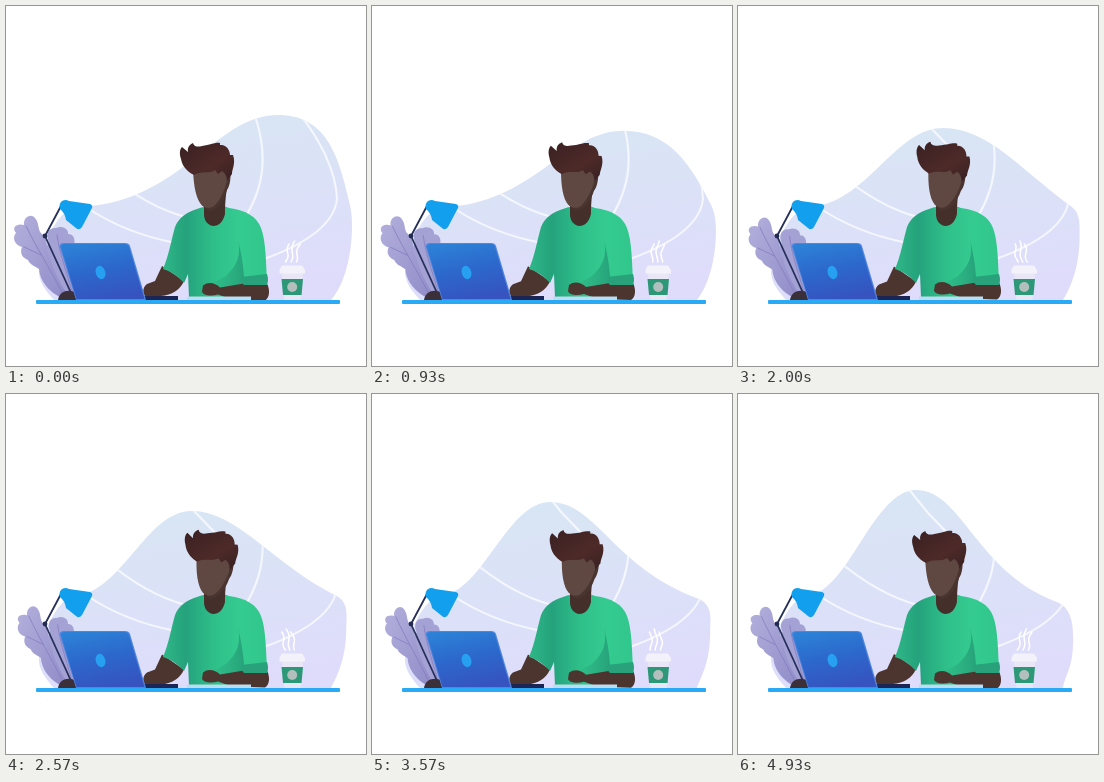
These frames come from a looping animation (360 px wide and 360 px high, 5 s). An HTML page:

```html
<!DOCTYPE html>
<html lang="en">
<head>
<meta charset="utf-8">
<title>Working at a desk</title>
<style>
html, body { margin: 0; width: 100%; height: 100%; overflow: hidden; background: #fff; }
svg { display: block; width: 100vw; height: 100vh; }
.line { fill: none; stroke-linecap: round; stroke-linejoin: round; }
</style>
</head>
<body>
<svg viewBox="0 0 360 360">
  <defs>
    <linearGradient id="sky" x1="0.3" y1="0" x2="0.55" y2="1">
      <stop offset="0" stop-color="#d8e6f4"/>
      <stop offset="1" stop-color="#dfdcfb"/>
    </linearGradient>
    <linearGradient id="screen" x1="0.3" y1="0" x2="0.6" y2="1">
      <stop offset="0" stop-color="#2c80d6"/>
      <stop offset="0.45" stop-color="#2c69cc"/>
      <stop offset="1" stop-color="#3653c0"/>
    </linearGradient>
    <linearGradient id="leaf" x1="0" y1="0" x2="1" y2="1">
      <stop offset="0" stop-color="#b3b0dc"/>
      <stop offset="1" stop-color="#8f8bc8"/>
    </linearGradient>
    <linearGradient id="shirt" x1="0" y1="0" x2="1" y2="0">
      <stop offset="0" stop-color="#2fb787"/>
      <stop offset="0.22" stop-color="#25a27c"/>
      <stop offset="0.5" stop-color="#2fc08a"/>
      <stop offset="0.75" stop-color="#34cb90"/>
      <stop offset="1" stop-color="#31c68c"/>
    </linearGradient>
    <linearGradient id="fold" x1="0" y1="0" x2="1" y2="0">
      <stop offset="0" stop-color="#27a27a" stop-opacity="0"/>
      <stop offset="0.6" stop-color="#27a27a"/>
    </linearGradient>
    <linearGradient id="hair" x1="0" y1="0" x2="1" y2="1">
      <stop offset="0" stop-color="#3a2022"/>
      <stop offset="0.6" stop-color="#4d2a28"/>
      <stop offset="1" stop-color="#372022"/>
    </linearGradient>
    <clipPath id="inside"><path id="clip"/></clipPath>
  </defs>

  <path id="blob" fill="url(#sky)"/>
  <g class="line" clip-path="url(#inside)" stroke="#f4f7fd" stroke-width="2.1">
    <path d="M247 104C259 137 263 172 240 210"/>
    <path d="M169 93L190 119L216 146"/>
    <path d="M98 165C118 182 145 202 180 211"/>
    <path d="M80 201C105 218 133 230 170 237"/>
    <path d="M292 106C313 132 330 164 331 193C328 221 294 240 258 253"/>
  </g>

  <g id="plant">
    <path fill="url(#leaf)" d="M61 294C48 290 34 278 33 263C29 260 24 259 22 254C15 251 14 246 16 241C8 239 6 231 10 227C5 221 11 217 18 219C17 211 25 207 29 212C34 218 31 224 36 228C42 232 39 239 43 244C53 254 60 275 61 294Z"/>
    <path fill="#a4a1d5" d="M65 294C55 279 47 265 44 251C40 246 40 240 43 236C39 228 43 221 50 222C56 219 63 223 62 228C69 228 70 236 67 241C71 248 72 258 72 266L75 294Z"/>
    <g class="line" stroke="#837dbd" stroke-width=".8">
      <path d="M20 220C30 241 42 259 58 290M35 249L18 241"/>
      <path d="M51 229C54 250 62 270 68 292"/>
    </g>
  </g>

  <!-- lamp -->
  <path class="line" stroke="#26305a" stroke-width="1.8" d="M55 200L39 230L66 289"/>
  <circle cx="39" cy="230" r="2.4" fill="#222b50"/>
  <path fill="#12a0ee" d="M54 203C52 197 57 192 63 195L84 198Q87 199 86 202L76 221Q73 225 70 222L60 214Q59 207 54 203Z"/>
  <path fill="#3b2f3a" d="M52 294C53 287 59 284 65 285C71 286 73 290 74 294Z"/>

  <!-- person -->
  <path id="leftHand" fill="#4d352f" d="M156 260L178 275C174 284 166 289 155 290L141 291C136 290 136 281 141 278L149 275Z"/>
  <path fill="url(#shirt)" d="M191 203C201 199 217 199 223 202C240 204 251 211 255 222C260 235 260 257 261 275L244 278L238 292H183L182 268L178 277Q168 266 157 263C163 249 165 235 169 221C173 211 181 206 191 203Z"/>
  <path fill="url(#fold)" d="M232 234C235 248 232 259 220 270L203 279L238 288L261 278V270L238 271C237 257 235 246 232 234Z"/>
  <path fill="#452f2b" d="M198 190L221 181C219 195 219 204 219 208C217 216 213 220 207 220C201 219 198 214 198 208Z"/>
  <g id="head">
    <path fill="#493430" d="M190 163L223 160C226 170 224 180 221 184C218 195 212 204 203 205L196 199Z"/>
    <path fill="#5f4841" d="M187 158L222 158C223 176 217 190 210 198C205 204 198 203 194 197C189 189 187 175 187 158Z"/>
    <path fill="url(#hair)" d="M188 169C180 165 176 159 175 153C173 147 174 143 176 141L182 146C181 140 185 138 187 137C188 141 192 141 196 140C205 139 209 136 214 137L214 139C220 138 224 144 224 149L227 149C230 157 226 163 226 168L221 175C221 170 219 167 216 165L212 168L209 164C203 168 196 165 190 168Z"/>
  </g>
  <g id="rightHand" fill="#4d352f">
    <path d="M197 279C202 275 209 276 214 281L238 277H261C264 283 264 291 259 294L226 293L212 288C205 290 197 289 196 285Z"/>
  </g>
  <path fill="#29a27c" d="M235 271L261 268Q263 274 261 279H238Q235 276 235 271Z"/>
  <path fill="#bcdcf0" d="M181 290.500H245V294H181Z"/>

  <!-- laptop -->
  <path fill="#1d2554" d="M137 290H172V294H137Z"/>
  <path fill="#4f86e0" d="M53.500 240Q54 237 58 237H119Q123 237 124 240L140 294H70Z"/>
  <path fill="url(#screen)" d="M55 241Q55 238 59 238H119Q122 238 123 241L138.500 293H70.500Z"/>
  <ellipse cx="94.500" cy="266.500" rx="4.800" ry="6.800" transform="rotate(-16 94.500 266.500)" fill="#28a0f2"/>

  <!-- cup -->
  <path fill="#e9e7f6" d="M276 267H297L294.500 294H278.500Z"/>
  <path fill="#f3f2fa" d="M275 261Q275 259.500 277 259.500H295Q297 259.500 297 261L299 264V267.500H273.500V264Z"/>
  <path fill="#2d9878" d="M275.500 273H297L295.500 289H277Z"/>
  <circle cx="286.200" cy="281" r="5" fill="#b3bfbd"/>
  <path id="steam" class="line" stroke="#fff" stroke-width="1.5"/>

  <rect x="30" y="294" width="304" height="4" rx="1" fill="#2aaaf4"/>
</svg>
<script>
const LOOP = 5000;
const set = (id, name, value) => document.getElementById(id).setAttribute(name, value);
const ease = u => { u = Math.min(u, 1); return u * u * (3 - 2 * u); };

// One crest drifts left, dips, then climbs while the right flank hollows out.
function hill(t) {
  const px = 272 - 94 * ease(t / 0.62);
  const py = 139.7 - 44.3 * t - 30.7 * Math.max(0, 1 - t / 0.35) ** 2;
  const pull = [332 - 94 * ease(t / 0.8), 145 + 33 * Math.sqrt(t)];
  const side = [343 - 25 * t, 195 + 13 * t];
  const lead = side.map((n, k) => n + 0.2 * (n - pull[k]));
  const ex = 346 - 11 * t, ey = 220 + 25 * t;
  return `M48 294C40 285 32 275 33 264C34 245 50 204 70 201
    C${0.69 * px - 13} 199 ${0.77 * px - 2} ${py} ${px} ${py}
    C${px + 46} ${py} ${pull} ${side}
    C${lead} ${ex} ${ey - 12} ${ex} ${ey}
    C${ex} ${ey + 30} ${ex - 8} 280 325 294Z`;
}

function steam(phase) {
  const lean = 4 * Math.cos(phase);
  let d = "";
  for (let i = 0; i < 3; i++) {
    for (let n = 0; n <= 12; n++) {
      const s = n / 12;
      const x = 279.5 + 5 * i + lean * s + 1.3 * Math.sin(6 * s + phase + 0.4 * i);
      d += `${n ? "L" : "M"}${x} ${256 - (i === 1 ? 21 : 18) * s}`;
    }
  }
  return d;
}

function draw(t) {
  const shape = hill(t);
  set("blob", "d", shape);
  set("clip", "d", shape);

  const nod = Math.sin(Math.PI * t);
  set("head", "transform", `rotate(${4.4 * nod} 207 210)`);
  set("rightHand", "transform", `translate(0 ${0.5 - nod})`);
  set("leftHand", "transform", `translate(0 ${0.5 * nod})`);

  const sway = Math.sin(Math.PI * t / 1.6) ** 2;
  set("plant", "transform",
    `translate(60 294) scale(${1 - 0.1 * sway} ${1 - 0.04 * sway}) translate(-60 -294)`);

  set("steam", "d", steam(2 * Math.PI * t));
}

function tick() {
  draw(performance.now() % LOOP / LOOP);
  requestAnimationFrame(tick);
}
tick();
</script>
</body>
</html>
```
